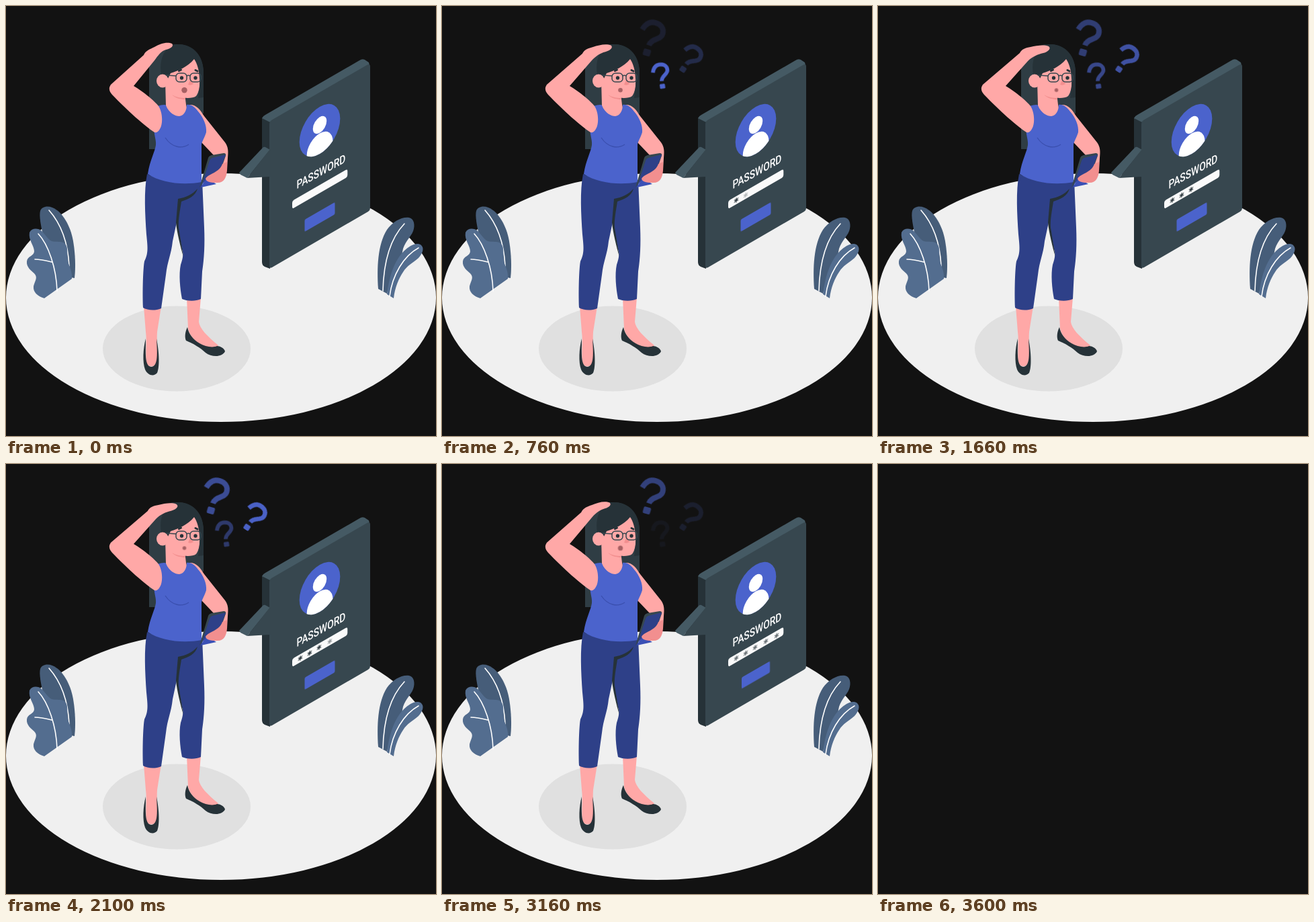
Animation, 640 px wide and 640 px high, one loop 3620 ms. Source, as an HTML page:

```html
<!DOCTYPE html>
<html lang="en">
<head>
<meta charset="utf-8">
<title>Forgotten password</title>
<style>
  html, body { margin: 0; width: 100%; height: 100%; overflow: hidden; background: #121212; }
  svg { display: block; width: 100vw; height: 100vh; }

  .navy { fill: #263238; }
  .slate { fill: #37474f; }
  .steel { fill: #455a64; }
  .skin { fill: #ffa8a7; }
  .blush { fill: #f28f8f; }
  .blue { fill: #4b63cc; }
  .denim { fill: #2e4088; }
  .white { fill: #fff; }
  .leaf-back { fill: #465d79; }
  .leaf { fill: #536d8f; }
  .vein { fill: none; stroke: #fff; stroke-width: 1.6; stroke-linecap: round; }
  .line { fill: none; stroke: #37474f; stroke-width: 1.5; }
  .brow { fill: none; stroke: #263238; stroke-width: 3; stroke-linecap: round; }
  .label { font: 500 17.5px Roboto, sans-serif; fill: #fff; }

  /* one shared 3620 ms loop */
  .scene, .arm, .mouth, .q, .star, .stars, .button { animation: 3620ms linear infinite; }
  .scene { animation-name: cut; animation-timing-function: step-end; }
  .arm { animation-name: rub; }
  .mouth { animation-name: gasp; transform-box: fill-box; transform-origin: center; }
  .button { animation-name: press; transform-box: fill-box; transform-origin: center; }
  .q1 { animation-name: q1; }
  .q2 { animation-name: q2; }
  .q3 { animation-name: q3; }
  .stars { animation-name: clear; }
  .s1 { animation-name: s1; }
  .s2 { animation-name: s2; }
  .s3 { animation-name: s3; }
  .s4 { animation-name: s4; }
  .s5 { animation-name: s5; }

  @keyframes cut { 0% { visibility: visible; } 99.44%, 100% { visibility: hidden; } }

  @keyframes rub {
    0%, 100% {
      d: path("M221 188 C208 180 180 155 158 132 C154 127 152 123 156 117 L205 73 C208 66 215 64 221 61 C229 56 240 53 247 56 C250 59 246 63 238 65 C231 67 226 74 221 81 L190 119 C205 128 222 142 227 149 C233 158 234 175 229 183 C227 187 224 189 221 188Z");
      animation-timing-function: cubic-bezier(.39, .575, .565, 1);
    }
    50% {
      d: path("M221 188 C208 180 180 155 158 132 C154 127 152 123 156 117 L211 70 C214 64 220 62 227 61 C236 59 247 57 254 60 C258 63 254 68 246 70 C238 72 230 75 223 82 L190 119 C205 128 222 142 227 149 C233 158 234 175 229 183 C227 187 224 189 221 188Z");
      animation-timing-function: cubic-bezier(.47, 0, .745, .715);
    }
  }
  @keyframes gasp {
    0%, 100% { transform: none; animation-timing-function: cubic-bezier(.39, .575, .565, 1); }
    50% { transform: scale(.65); animation-timing-function: cubic-bezier(.47, 0, .745, .715); }
  }
  @keyframes press { 0%, 82.9%, 96.1%, 100% { transform: none; } 89.5% { transform: scale(.9); } }

  @keyframes q1 { 0%, 2% { opacity: 0; } 20.5% { opacity: 1; } 92%, 100% { opacity: 0; } }
  @keyframes q2 { 0%, 6% { opacity: 0; } 57% { opacity: 1; } 92.5%, 100% { opacity: 0; } }
  @keyframes q3 { 0%, 15% { opacity: 0; } 21% { opacity: .15; } 78% { opacity: 1; } 99.4%, 100% { opacity: 0; } }

  @keyframes clear { 0%, 84.5% { opacity: 1; } 94.5%, 100% { opacity: 0; } }
  @keyframes s1 { 0% { opacity: 0; } 9.94%, 100% { opacity: 1; } }
  @keyframes s2 { 0%, 17.68% { opacity: 0; } 27.62%, 100% { opacity: 1; } }
  @keyframes s3 { 0%, 35.36% { opacity: 0; } 45.3%, 100% { opacity: 1; } }
  @keyframes s4 { 0%, 53.04% { opacity: 0; } 62.98%, 100% { opacity: 1; } }
  @keyframes s5 { 0%, 70.72% { opacity: 0; } 80.66%, 100% { opacity: 1; } }
</style>
</head>
<body>
<svg viewBox="0 0 640 640">
  <defs>
    <g id="ask">
      <path d="M-16 -9 C-13 -20 -7 -24 0 -24 C9 -24 15 -19 15 -11 C15 -1 1 -1 0 11" fill="none" stroke="#4b63cc" stroke-width="8"/>
      <rect class="blue" x="-5.5" y="17" width="11" height="10" rx="2"/>
    </g>
    <path id="star" d="M0 -3.6V3.6M-3.4 -1.9L3.4 1.9M-3.4 1.9L3.4 -1.9" transform="matrix(.866 -.5 0 1 0 0)" stroke="#263238" stroke-width="1.3"/>
  </defs>

  <g class="scene">
    <ellipse cx="320" cy="434" rx="320" ry="185" fill="#f0f0f0"/>
    <ellipse cx="254" cy="510" rx="110" ry="63.5" fill="#e0e0e0"/>

    <!-- plants -->
    <path class="leaf-back" d="M51 305 C53 299 61 297 69 300 C84 306 96 327 100 350 C103 368 104 388 102 405 L75 400 L56 345 C52 328 49 312 51 305Z"/>
    <path class="vein" d="M64 304 C80 322 92 347 94 387"/>
    <path class="leaf" d="M35 337 C38 331 46 330 52 334 C58 339 62 347 68 350 C74 352 83 349 88 354 C94 360 89 372 93 383 C96 391 99 398 98 406 L57 435 C47 432 40 426 41 417 C43 409 48 404 42 398 C38 394 30 389 31 380 C32 372 42 372 42 365 C42 357 33 348 35 337Z"/>
    <path class="vein" d="M48 339 C63 355 75 390 76 424 M43 377 C52 377 60 379 68 381"/>
    <path class="leaf-back" d="M554 421 C552 390 553 355 567 333 C575 321 590 313 600 315 C608 317 609 327 606 335 C602 345 592 352 590 366 C588 385 572 410 567 428Z"/>
    <path class="vein" d="M593 324 C573 345 562 380 561 424"/>
    <path class="leaf" d="M567 429 C570 405 577 380 592 365 C601 356 612 351 618 356 C623 361 620 368 614 375 C605 383 597 386 591 396 C585 405 579 418 577 435Z"/>
    <path class="vein" d="M614 360 C592 372 575 400 571 432"/>

    <!-- speech panel -->
    <path class="navy" d="M381 166 L393 171 V391 L385 388 Q381 386 381 381Z"/>
    <path class="steel" d="M381 167 Q382 164 386 162 L526 81 Q530 78 534 80 L540 84 L541 88 L393 173Z"/>
    <path class="slate" d="M392 175 Q392 172 395 170 L537 88 Q542 85 542 90 V301 Q542 304 539 306 L396 389 Q392 391 392 387Z"/>
    <path class="steel" d="M347 248 L382 211 Q384 209 386 210 L393 214 L359 256 L349 251Z"/>
    <path class="slate" d="M359 256 L393 213 V254Z"/>

    <g transform="matrix(.866 -.5 0 1 467 185)">
      <circle class="blue" r="35"/>
      <circle class="white" cy="-8" r="11.8"/>
      <path class="white" d="M-22.4 27 A22.4 22.5 0 0 1 22.4 27 A35 35 0 0 1 -22.4 27Z"/>
    </g>
    <text class="label" transform="matrix(.79 -.435 0 1 432.5 272.5)">PASSWORD</text>
    <rect width="95" height="12" rx="3" fill="#fafafa" transform="matrix(.866 -.5 0 1 426 290)"/>
    <g transform="matrix(.866 -.5 0 1 467 314)">
      <rect class="button blue" x="-26" y="-9" width="52" height="18" rx="2"/>
    </g>
    <g class="stars">
      <use class="star s1" href="#star" x="438" y="289"/>
      <use class="star s2" href="#star" x="452" y="281.5"/>
      <use class="star s3" href="#star" x="466" y="273"/>
      <use class="star s4" href="#star" x="482" y="264"/>
      <use class="star s5" href="#star" x="498" y="255.5"/>
    </g>

    <!-- question marks -->
    <g class="q q1"><use href="#ask" transform="translate(326 104) rotate(-8) scale(.71)"/></g>
    <g class="q q2"><use href="#ask" transform="translate(368.5 79) rotate(33) scale(.82)"/></g>
    <g class="q q3"><use href="#ask" transform="translate(311 48) rotate(16)"/></g>

    <!-- legs and shoes -->
    <path class="skin" d="M205 447 H231 L225 485 C224 500 226 520 225 530 C222 538 212 538 209 532 C207 515 210 500 208 485Z"/>
    <path class="navy" d="M208 495 C204 510 203 530 207 541 C211 550 220 552 225 546 C229 537 228 515 224 495 C225 515 227 537 216 537 C206 536 208 515 208 495Z"/>
    <path class="skin" d="M269 434 H290 L287 470 C288 480 300 492 316 505 C312 510 300 510 290 505 C280 498 273 490 271 480Z"/>
    <path class="navy" d="M270 478 C266 486 266 494 268 498 C278 502 290 509 297 516 C306 523 322 523 326 514 C325 509 318 506 314 506 C308 509 296 507 288 502 C278 496 272 488 270 478Z"/>
    <path class="denim" d="M210 250 C232 262 270 264 292 259 L295 330 C296 355 295 375 292 395 L290 436 C282 440 268 439 262 436 C259 420 257 400 260 385 C264 374 264 368 262 362 L254 322 L248 350 C246 370 240 380 238 400 L231 450 C222 454 210 453 204 449 C203 425 204 390 206 380 C212 368 211 360 209 340 C207 310 205 275 210 250Z"/>
    <path class="navy" d="M256 287 C268 285 278 280 285 272 C282 283 272 287 261 291 C259 305 256 318 257 330 L264 373 C260 360 254 335 253 322Z"/>

    <!-- torso, neck and phone arm -->
    <path fill="#2f3d44" d="M213 90 V213 H224 L228 160 H294 V100 C294 70 275 57 255 57 C235 57 213 70 213 90Z"/>
    <path class="skin" d="M272 147 C283 146 289 154 295 164 L326 203 C331 210 331 216 330 226 L329 245 L310 240 L309 222 L291 203 L295 185Z"/>
    <path class="skin" d="M237 110 L238 149 C240 160 250 168 258 167 C268 166 271 156 268 147 L266 130Z"/>
    <path class="blue" d="M225 149 C232 147 237 146 238 148 C243 160 252 164 258 164 C266 163 269 154 269 147 C275 146 281 150 286 157 C294 166 299 178 298 188 C296 195 292 201 291 206 V262 C265 267 232 264 211 250 C214 230 222 216 223 207 C224 198 219 190 221 180Z"/>
    <path d="M237 196 C247 211 262 213 272 206" fill="none" stroke="#3a4fae" stroke-width="1.3"/>
    <path fill="#3a50b5" d="M290 270 L313 265 L298 256Z"/>
    <path class="slate" d="M288 270 L301 226 Q302 223 306 222 L324 219 Q328 219 327 223 L321 240 L297 257Z"/>
    <path class="denim" d="M291 267 L303 230 Q304 227 307 226 L327 221 L321 238 C317 247 302 250 297 259Z"/>
    <path class="blush" d="M297 257 C302 249 318 248 322 235 L329 232 L329 245 C328 256 324 263 315 263 C308 263 298 263 297 257Z"/>

    <!-- head -->
    <path class="skin" d="M237 97 L256 84 L280 76 C286 85 289 96 289 106 C289 118 287 129 283 134 C278 138 266 137 260 136 L238 125Z"/>
    <path class="blush" d="M247 132 C253 136 260 137 267 137 L267 139 C259 139 252 137 247 132Z"/>
    <path class="navy" d="M232 106 C226 80 236 58 256 57 C280 57 294 75 294 100 V136 L286 137 C290 115 289 92 280 79 C270 91 257 96 245 100 L239 112Z"/>
    <ellipse class="skin" cx="233" cy="111.5" rx="9" ry="10"/>
    <path class="brow" d="M257.5 96.5 L260.5 95 M282 95.5 L285 97"/>
    <path class="blush" d="M275 108 L271 117 Q275 119 279 116Z"/>
    <rect class="line" x="253" y="100" width="16" height="13" rx="5"/>
    <rect class="line" x="274" y="100" width="16" height="13" rx="5"/>
    <path class="line" d="M238 103 L253 104 M269 104 Q271.500 102.500 274 104"/>
    <circle class="navy" cx="261.500" cy="107" r="2.700"/>
    <circle class="navy" cx="282" cy="107" r="2.700"/>
    <ellipse class="mouth" cx="265.500" cy="125.200" rx="4.200" ry="4.200" fill="#a76063"/>

    <path class="arm skin" d="M221 188 L156 122 L205 73 L247 56 L190 119 L227 149Z"/>
  </g>
</svg>
</body>
</html>
```
